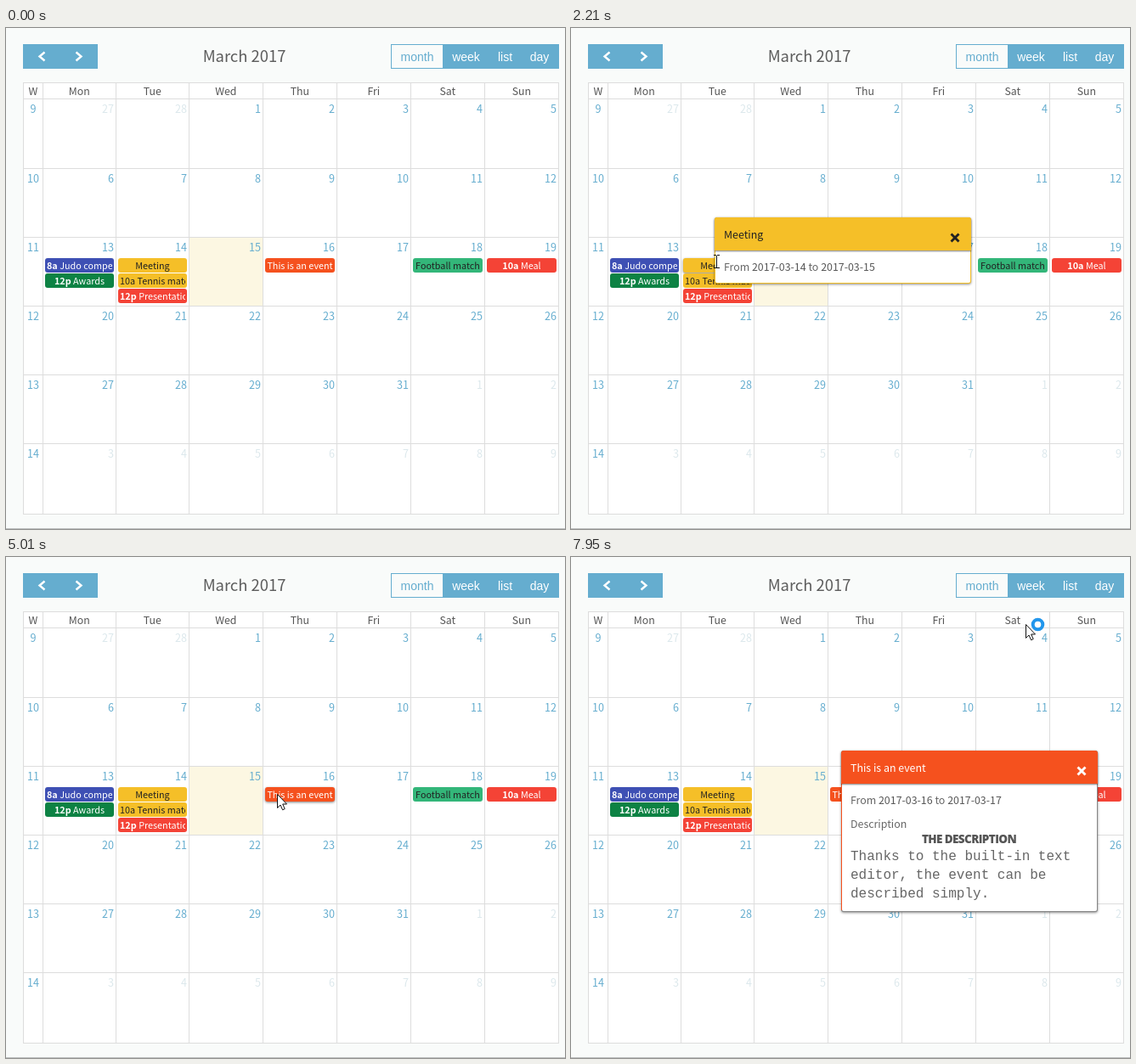
These frames come from a looping animation (658x590 px, 8 s). An HTML page with a canvas:

```html
<!DOCTYPE html>
<html lang="en">
<head>
<meta charset="utf-8">
<title>Calendar</title>
<style>
html, body { margin: 0; width: 100%; height: 100%; overflow: hidden; background: #f9fbfa; }
canvas { display: block; }
</style>
</head>
<body>
<canvas id="stage" width="658" height="590"></canvas>
<script>
const ctx = document.getElementById('stage').getContext('2d');
const LOOP = 8000;
const SANS = '"Noto Sans CJK JP", "Noto Sans CJK SC", "Noto Sans CJK", "Open Sans", sans-serif';
const ARIAL = '"Liberation Sans", Arial, sans-serif';
const MONO = '"Liberation Mono", "Courier New", monospace';
const IMPACT = 'Impact, "Open Sans", sans-serif';
const BLUE = '#65adcf', GREY = '#dddddd', INK = '#555555', YELLOW = '#f5bf28', ORANGE = '#f5511e';
const COLS = [20, 43, 129, 215, 302, 389, 476, 563, 650];
const ROWS = [64, 83, 165, 246, 327, 408, 489, 572];
const DAYS = ['Mon', 'Tue', 'Wed', 'Thu', 'Fri', 'Sat', 'Sun'];
const EVENTS = [
  { col: 1, slot: 0, color: '#3e50b4', time: '8a', name: 'Judo competition', ink: '#fff' },
  { col: 1, slot: 1, color: '#0d8244', time: '12p', name: 'Awards', ink: '#fff' },
  { col: 2, slot: 0, color: YELLOW, name: 'Meeting', ink: '#222', hover: [1600, 3070] },
  { col: 2, slot: 1, color: YELLOW, time: '10a', name: 'Tennis match', ink: '#222' },
  { col: 2, slot: 2, color: '#f44336', time: '12p', name: 'Presentation', ink: '#fff' },
  { col: 4, slot: 0, color: ORANGE, name: 'This is an event', ink: '#fff', hover: [4950, 7260] },
  { col: 6, slot: 0, color: '#33b679', name: 'Football match', ink: '#222' },
  { col: 7, slot: 0, color: '#f44336', time: '10a', name: 'Meal', ink: '#fff' }
];

// Pointer moves: start, end, number of steps, waypoints
const MOVES = [
  { from: 900, to: 1680, steps: 11, path: [[25, 425], [100, 345], [171, 275]] },
  { from: 3070, to: 3460, steps: 6, path: [[215, 268], [350, 254], [477, 241]] },
  { from: 3610, to: 3760, steps: 3, path: [[474, 241], [469, 242], [463, 244]] },
  { from: 3930, to: 4080, steps: 3, path: [[460, 245], [457, 246], [455, 246]] },
  { from: 4310, to: 4560, steps: 4, path: [[455, 246], [420, 270], [376, 288]] },
  { from: 4710, to: 5010, steps: 5, path: [[340, 289], [261, 286], [319, 279]] },
  { from: 7260, to: 7950, steps: 10, path: [[331, 268], [450, 158], [535, 79]] }
];

const within = (t, a, b) => t >= a && t < b;

function box(x, y, w, h, color) {
  ctx.fillStyle = color;
  ctx.fillRect(x, y, w, h);
}

function rounded(x, y, w, h, r, color) {
  ctx.beginPath();
  ctx.roundRect(x, y, w, h, r);
  ctx.fillStyle = color;
  ctx.fill();
}

function stroke(points, color, width) {
  ctx.beginPath();
  points.forEach(p => ctx.lineTo(p[0], p[1]));
  ctx.strokeStyle = color;
  ctx.lineWidth = width;
  ctx.stroke();
}

function shadow(alpha, blur, dy) {
  ctx.shadowColor = `rgba(0,0,0,${alpha})`;
  ctx.shadowBlur = blur;
  ctx.shadowOffsetY = dy;
}

const font = (size, weight, family = SANS) => `${weight} ${size}px ${family}`;

function text(str, x, y, f, color, align = 'left') {
  ctx.font = f;
  ctx.fillStyle = color;
  ctx.textAlign = align;
  ctx.fillText(str, x, y);
}

// Draws [string, weight, color] runs one after another
function runs(list, x, y, size) {
  for (const [str, weight, color] of list) {
    text(str, x, y, font(size, weight), color);
    x += ctx.measureText(str).width;
  }
}

function runsWidth(list, size) {
  return list.reduce((sum, [str, weight]) => {
    ctx.font = font(size, weight);
    return sum + ctx.measureText(str).width;
  }, 0);
}

function toolbar() {
  box(20, 19, 88, 29, BLUE);
  stroke([[45.5, 28.5], [39.5, 33.5], [45.5, 38.5]], '#fff', 2.4);
  stroke([[82.5, 28.5], [88.5, 33.5], [82.5, 38.5]], '#fff', 2.4);
  text('March 2017', 280.5, 40, font(18.4, 500), '#5c5c5c', 'center');
  box(453, 19, 198, 29, BLUE);
  box(454, 20, 60, 27, '#f9fbfa');
  const f = font(14, 400, ARIAL);
  text('month', 484, 39, f, BLUE, 'center');
  [['week', 541.5], ['list', 587.5], ['day', 628]].forEach(([s, x]) => {
    text(s, x, 39, f, '#fff', 'center');
  });
}

function grid() {
  box(20, 64, 631, 509, '#fff');
  box(216, 247, 86, 80, '#fcf7e2');
  COLS.forEach(x => box(x, 64, 1, 509, GREY));
  ROWS.forEach(y => box(20, y, 631, 1, GREY));
  text('W', 32, 79, font(12.3, 500), INK, 'center');
  DAYS.forEach((d, i) => text(d, (COLS[i + 1] + COLS[i + 2]) / 2 + 0.3, 79, font(12.3, 500), INK, 'center'));
  for (let r = 0; r < 6; r++) {
    const y = ROWS[r + 1] + 17;
    text(String(9 + r), 32, y, font(12.6, 400), BLUE, 'center');
    for (let c = 0; c < 7; c++) {
      const n = r * 7 + c - 1;
      const inside = n >= 1 && n <= 31;
      const day = n < 1 ? n + 28 : n > 31 ? n - 31 : n;
      text(String(day), COLS[c + 2] - 2, y, font(12.6, 400), inside ? BLUE : '#dce8ec', 'right');
    }
  }
}

function eventBar(e, t) {
  const x = COLS[e.col] + 3, y = 271 + 18 * e.slot;
  const w = COLS[e.col + 1] - x - 2, size = 10.8;
  ctx.save();
  if (e.hover && within(t, ...e.hover)) shadow(0.5, 3, 1);
  rounded(x, y, w, 17, 3, e.color);
  ctx.restore();
  const weight = e.ink === '#fff' ? 500 : 400;
  const list = [[e.name, weight, e.ink]];
  if (e.time) list.unshift([e.time + ' ', e.ink === '#fff' ? 700 : 500, e.ink]);
  ctx.save();
  ctx.beginPath();
  ctx.rect(x + 2, y, w - 4, 17);
  ctx.clip();
  runs(list, x + Math.max(2, (w - runsWidth(list, size)) / 2), y + 13, size);
  ctx.restore();
}

function popup(x, y, h, color, edge, ink, title, start, end) {
  ctx.save();
  shadow(0.45, 3, 1);
  rounded(x, y, 302, h, 3, edge);
  ctx.restore();
  box(x, y + 3, 1, h - 5, color);
  rounded(x + 1, y + 39, 300, h - 40, [0, 0, 2, 2], '#fff');
  ctx.save();
  shadow(0.5, 2, 1);
  rounded(x, y, 302, 39, [3, 3, 0, 0], color);
  ctx.restore();
  text(title, x + 11, y + 25, font(12.4, ink === '#fff' ? 500 : 400), ink);
  const cx = x + 283, cy = y + 24;
  stroke([[cx - 4.5, cy - 4.5], [cx + 4.5, cy + 4.5]], ink, 2.8);
  stroke([[cx + 4.5, cy - 4.5], [cx - 4.5, cy + 4.5]], ink, 2.8);
  runs([['From ', 400, '#666'], [start, 500, INK], [' to ', 400, '#666'], [end, 500, INK]], x + 11, y + 63, 12.4);
}

function meetingPopup() {
  popup(169, 223, 78, YELLOW, YELLOW, '#222', 'Meeting', '2017-03-14', '2017-03-15');
}

function eventPopup() {
  popup(318, 228, 190, ORANGE, '#858585', '#fff', 'This is an event', '2017-03-16', '2017-03-17');
  text('Description', 329, 319, font(12.4, 400), '#666');
  ctx.save();
  ctx.fontStretch = 'condensed';
  ctx.letterSpacing = '-0.6px';
  text('THE DESCRIPTION', 468.5, 337, font(13.5, 800, IMPACT), INK, 'center');
  ctx.restore();
  ['Thanks to the built-in text', 'editor, the event can be', 'described simply.'].forEach((s, i) => {
    text(s, 329, 357 + 22 * i, font(16, 400, MONO), '#666');
  });
}

function outline(points) {
  ctx.beginPath();
  points.forEach(p => ctx.lineTo(p[0], p[1]));
  ctx.closePath();
  ctx.fillStyle = '#fff';
  ctx.fill();
  ctx.strokeStyle = '#111';
  ctx.lineWidth = 1;
  ctx.stroke();
}

function arrow() {
  outline([[0.5, 0.5], [0.5, 16.5], [4, 13], [6.6, 18.8], [9.2, 17.6], [6.7, 12], [11.5, 12]]);
}

function hand() {
  outline([[-1.5, 1.5], [0, 0.5], [1.5, 1.5], [1.5, 7], [5, 7.5], [8.5, 8.5], [11, 10], [11.5, 15],
    [9.5, 18], [9.5, 21.5], [-0.5, 21.5], [-1, 18.5], [-5.5, 12.5], [-5, 11], [-1.5, 13]]);
}

function beam() {
  box(0, -7, 1, 15, '#111');
  [-8, 7].forEach(y => {
    box(-3, y, 3, 1, '#111');
    box(1, y, 3, 1, '#111');
  });
}

function pointAt([a, b, c], u) {
  const k = u < 0.5 ? u * 2 : u * 2 - 1;
  const [p, q] = u < 0.5 ? [a, b] : [b, c];
  return [p[0] + (q[0] - p[0]) * k, p[1] + (q[1] - p[1]) * k];
}

function pointer(t) {
  const m = MOVES.filter(v => t >= v.from).pop();
  if (!m) return;
  const n = m.steps - 1;
  const i = Math.min(n, Math.floor((t - m.from) / (m.to - m.from) * n + 0.001));
  const [x, y] = pointAt(m.path, i / n);
  ctx.save();
  ctx.translate(Math.round(x), Math.round(y));
  if (within(t, 1680, 3070)) beam();
  else if (within(t, 3930, 4310)) hand();
  else arrow();
  if (t >= 7870) {
    ctx.beginPath();
    ctx.arc(14.5, 0.5, 5.8, 0, Math.PI * 2);
    ctx.fillStyle = '#fff';
    ctx.fill();
    ctx.strokeStyle = '#2196ec';
    ctx.lineWidth = 4;
    ctx.stroke();
  }
  ctx.restore();
}

function draw(now) {
  const t = now % LOOP;
  box(0, 0, 658, 590, '#f9fbfa');
  box(0, 589, 658, 1, '#bfc1c1');
  toolbar();
  grid();
  EVENTS.forEach(e => eventBar(e, t));
  if (within(t, 2210, 4310)) meetingPopup();
  if (t >= 5560) eventPopup();
  pointer(t);
}

let begin;
function tick(now) {
  begin ??= now;
  draw(now - begin);
  requestAnimationFrame(tick);
}
draw(0);
requestAnimationFrame(tick);
</script>
</body>
</html>
```
